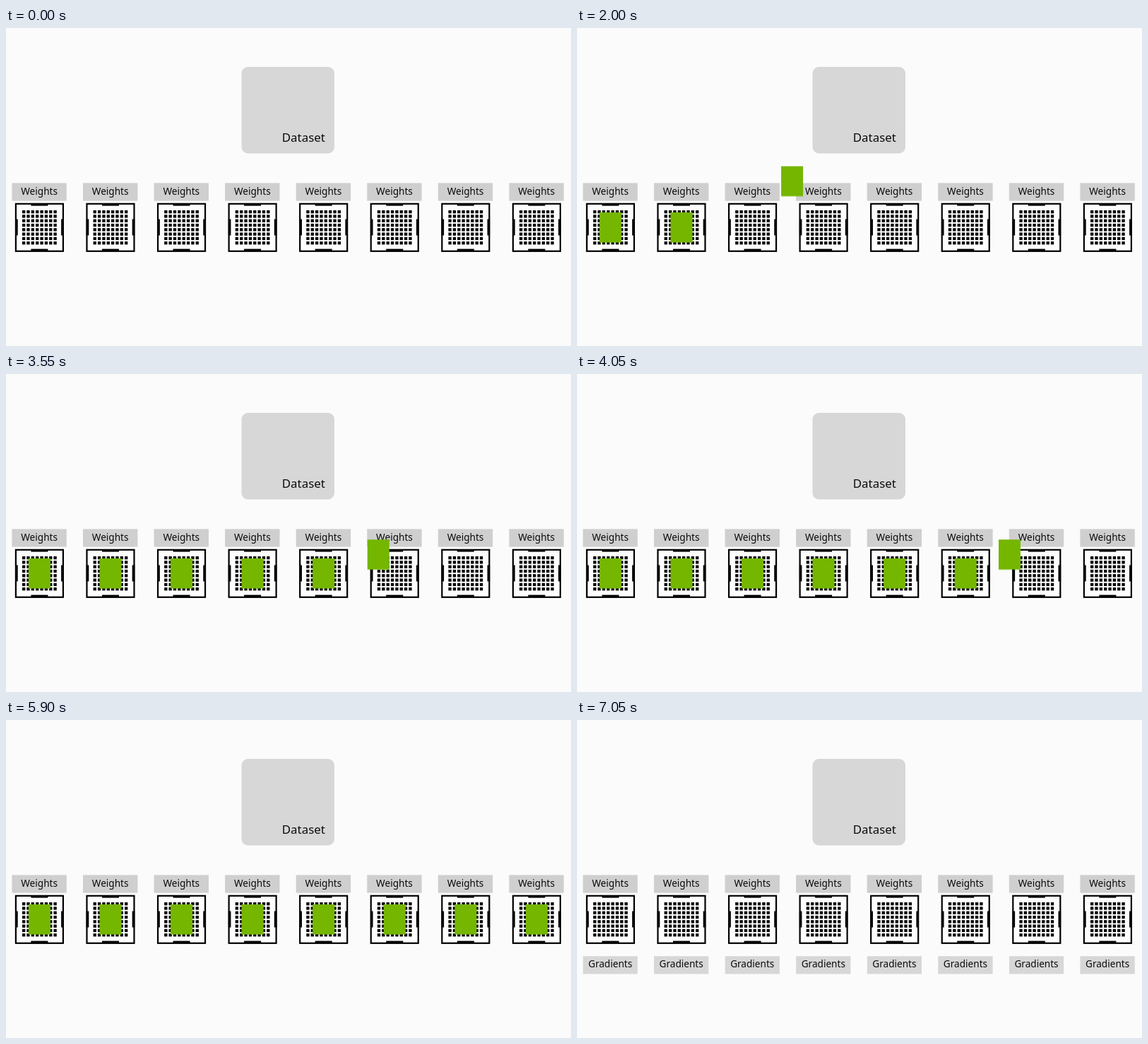
Write an HTML page that moves like this. It is 800x450 px and loops after 8000 ms.

```html
<!DOCTYPE html>
<html lang="en">
<head>
<meta charset="utf-8">
<title>Dataset to weights to gradients</title>
<style>
  html, body { margin: 0; width: 100%; height: 100%; overflow: hidden; background: #fbfbfb; }
  svg { display: block; width: 800px; height: 450px; }
  text { font-family: "Noto Sans", "Open Sans", sans-serif; font-size: 13.6px; fill: #0c0c0c; text-anchor: middle; }
  .card { fill: #74b600; }
</style>
</head>
<body>
<svg id="stage" viewBox="0 0 800 450"></svg>
<script>
const LOOP = 8000, COUNT = 8, PITCH = 100.57, FIRST = 47.1;
const CARD = { w: 31, h: 42.5 };
const START = { x: 383.5, y: 85.5 }, LAND_Y = 261;
const LAUNCH = 700, GAP = 500;
const FADE = [6000, 7050];

// [ms after launch, share of the way]
const EASE = [
  [0, 0], [100, .025], [150, .06], [200, .12], [250, .3], [300, .623],
  [350, .847], [400, .888], [450, .937], [500, .96], [600, .99], [700, 1]
];

const stage = document.getElementById("stage");

function add(parent, tag, attrs, text) {
  const el = document.createElementNS("http://www.w3.org/2000/svg", tag);
  for (const key in attrs) el.setAttribute(key, attrs[key]);
  if (text) el.textContent = text;
  parent.append(el);
  return el;
}

function box(parent, x, y, width, height, fill = "#000", rx = 0) {
  return add(parent, "rect", { x, y, width, height, fill, rx });
}

function label(parent, text, y, fill) {
  box(parent, -38.7, y, 77.4, 25.2, fill);
  add(parent, "text", { x: 0, y: y + 16.2 }, text);
}

function chip(parent) {
  add(parent, "rect", {
    x: -33.2, y: 248.8, width: 67, height: 67,
    fill: "#fdfdfd", stroke: "#000", "stroke-width": 2.2
  });
  box(parent, -11.7, 248, 24, 3.6);
  box(parent, -11.7, 312.6, 24, 3.6);
  box(parent, -34, 270.5, 3.6, 23);
  box(parent, 31, 270.5, 3.6, 23);
  for (let r = 0; r < 8; r++)
    for (let c = 0; c < 8; c++)
      box(parent, -24.1 + c * 6.35, 258 + r * 6.3, 4.3, 4.3);
}

function play(el, frames) {
  el.animate(
    frames.map(([ms, style]) => ({ offset: ms / LOOP, ...style })),
    { duration: LOOP, iterations: Infinity }
  );
}

box(stage, 333.5, 55, 131.5, 122.5, "#d7d7d7", 9);
add(stage, "text", { x: 421.3, y: 160.6, style: "font-size:16.9px" }, "Dataset");

const centers = Array.from({ length: COUNT }, (_, i) => FIRST + i * PITCH);

for (const x of centers) {
  const unit = add(stage, "g", { transform: `translate(${x} 0)` });
  label(unit, "Weights", 219.4, "#cfcfcf");
  chip(unit);
  const grads = add(unit, "g", {});
  label(grads, "Gradients", 334.2, "#d7d7d7");
  play(grads, [
    [0, { opacity: 0 }], [FADE[0], { opacity: 0 }],
    [FADE[1], { opacity: 1 }], [LOOP, { opacity: 1 }]
  ]);
}

centers.forEach((x, i) => {
  const card = add(stage, "rect", { class: "card", width: CARD.w, height: CARD.h });
  const go = LAUNCH + GAP * i;
  const landX = x + .3 - CARD.w / 2;
  const at = p => ({
    transform: `translate(${START.x + (landX - START.x) * p}px, ${START.y + (LAND_Y - START.y) * p}px)`
  });
  play(card, [[0, at(0)], ...EASE.map(([ms, p]) => [go + ms, at(p)]), [LOOP, at(1)]]);
  play(card, [
    [0, { opacity: 0 }], [go, { opacity: 0 }], [go, { opacity: 1 }],
    [FADE[0], { opacity: 1 }], [FADE[1], { opacity: 0 }], [LOOP, { opacity: 0 }]
  ]);
});
</script>
</body>
</html>
```
